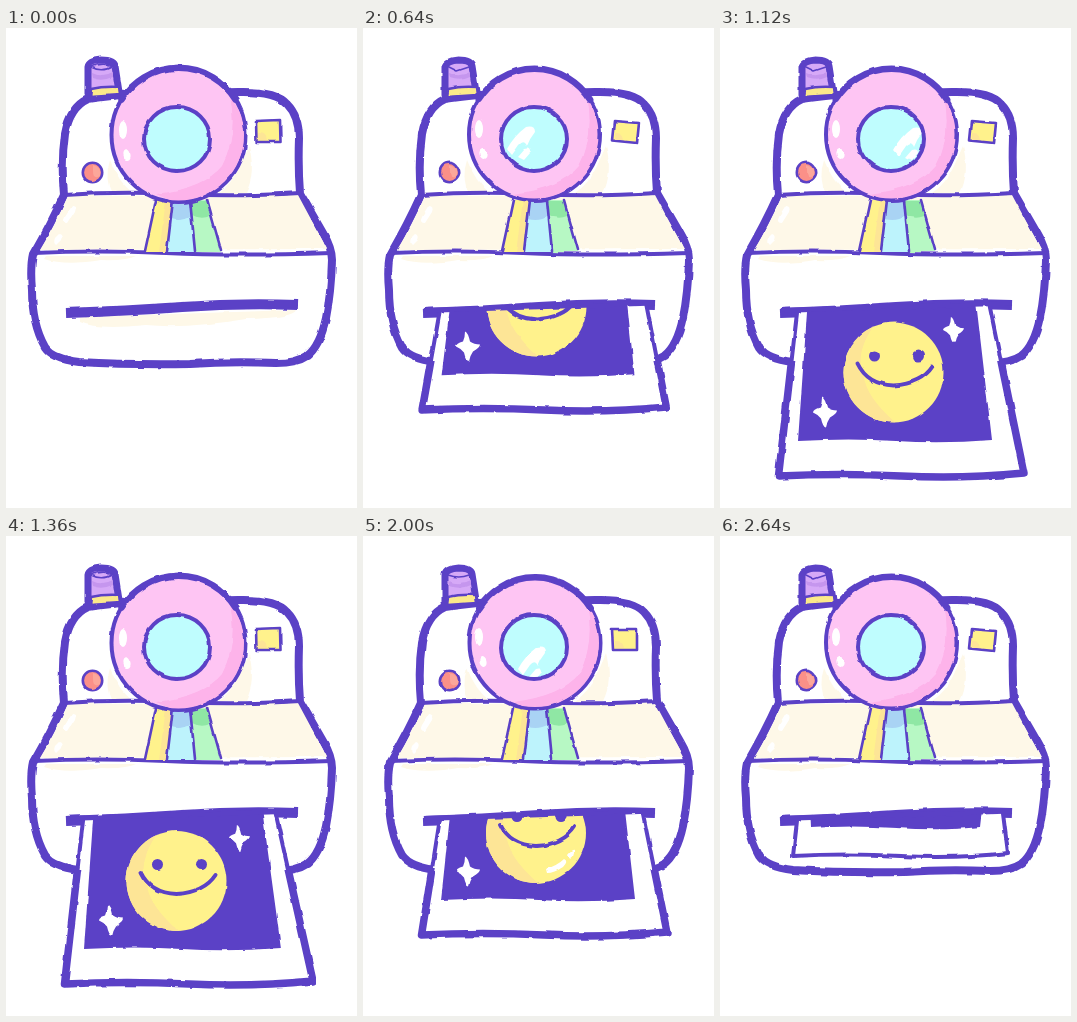
Recreate the animation shown at these times as an HTML page. Size 351 px wide and 480 px high, loop 2.72 s.

```html
<!DOCTYPE html>
<html lang="en">
<head>
<meta charset="utf-8">
<title>Instant camera</title>
<style>
  html, body { margin: 0; width: 100%; height: 100%; overflow: hidden; background: #fff; }
  svg { display: block; width: 100vw; height: 100vh; }
  .ink { stroke: #5b41c6; stroke-linecap: round; stroke-linejoin: round; }
  .bold { stroke-width: 8; }
  .mid { stroke-width: 4; }
  .thin { stroke-width: 2.6; }
  .butt { stroke-linecap: butt; }
</style>
</head>
<body>
<svg viewBox="0 0 351 480" fill="none">
  <defs>
    <filter id="rough" filterUnits="userSpaceOnUse" x="0" y="0" width="351" height="480" color-interpolation-filters="sRGB">
      <feTurbulence id="noise" type="fractalNoise" baseFrequency="0.07" numOctaves="2" seed="3" result="n"/>
      <feDisplacementMap in="SourceGraphic" in2="n" scale="3" xChannelSelector="R" yChannelSelector="G"/>
    </filter>
    <clipPath id="slotClip"><path d="M40 284.500L310 275.500V480H40Z"/></clipPath>
    <clipPath id="belowClip"><path d="M0 333H351V480H0Z"/></clipPath>
    <clipPath id="paneClip"><path id="paneShape"/></clipPath>
    <clipPath id="ringClip"><circle id="ringShape"/></clipPath>
    <clipPath id="glassClip"><ellipse cx="171" cy="111" rx="31" ry="30"/></clipPath>
    <clipPath id="faceClip"><circle r="50"/></clipPath>
    <path id="star" fill="#fff" d="M-3 -15Q0 -14 2 -5Q6 -2 12 -2Q12 1 5 5Q2 9 1 15Q-2 15 -4 6Q-7 2 -12 0Q-12 -3 -5 -5Q-3 -9 -3 -15Z"/>
  </defs>
  <g filter="url(#rough)">
    <!-- button -->
    <path class="ink" stroke-width="7" fill="#d6a9f7" d="M82 66L82 39Q83 33 95 32Q108 32 109 38L113 64Z"/>
    <path fill="#c596ee" d="M86 45Q96 50 107 44L107 49Q97 54 87 50Z"/>
    <path id="cap" class="ink" stroke-width="1.600"/>
    <!-- body -->
    <path class="ink bold" fill="#fff" d="M58 167Q55 134 59 106Q64 79 82 71Q95 69 115 67L232 64Q270 63 281 76Q293 88 293 110Q292 140 294 165L317 205Q326 220 326 232Q325 265 320 290Q314 318 301 328Q291 335 270 335Q225 333 184 336Q125 337 73 334Q47 331 39 319Q26 296 26 262Q24 240 27 227Q45 196 58 167Z"/>
    <path class="ink thin" fill="#fbe98a" d="M85 61Q98 58 113 59L114 67L84 69Z"/>
    <path fill="#fef8e8" d="M62 168L292 167L321 221L34 222Q50 196 62 168Z"/>
    <path fill="#fef8e8" d="M234 138Q226 156 212 165H240Q250 145 243 118ZM104 132Q112 154 128 166H106Q98 150 104 132ZM40 228H130Q120 233 95 232Q60 238 38 231Z"/>
    <path fill="#fff" d="M66 178Q71 178 69 184L62 195Q56 195 59 189ZM53 206Q57 207 55 212L50 217Q47 215 49 210Z"/>
    <path id="slotShade" fill="#fef8e8" d="M74 289L290 282Q287 290 240 291Q180 301 140 297Q90 302 74 294Z"/>
    <path class="ink mid" d="M58 167Q115 163 172 166T294 165M28 225Q90 222 160 225T325 225"/>
    <!-- ribbon -->
    <path fill="#fff28c" d="M150 172H167L161 224H139Z"/>
    <path fill="#bdf3fc" d="M167 172H184L189 224H161Z"/>
    <path fill="#b7f8c4" d="M184 172H201L215 224H189Z"/>
    <path fill="#fde596" d="M160 172H167L161 224H153Z"/>
    <path fill="#a9d3f4" d="M166 173H184L186 188Q176 194 165 191Z"/>
    <path fill="#8fe7a4" d="M184 173H201L204 188Q195 192 186 187Z"/>
    <path class="ink thin" d="M150 172L139 223M167 172L161 223M184 172L189 223M201 172L215 222"/>
    <!-- lens -->
    <circle id="ring" class="ink mid" fill="#fec5f3"/>
    <g clip-path="url(#ringClip)">
      <path fill="#fdb3ea" d="M224 68Q232 108 216 138Q198 160 150 166L172 176Q250 170 244 100Z"/>
    </g>
    <path id="lensTop" class="ink" stroke-width="6.500"/>
    <g id="shine" fill="#fff"><ellipse cx="117" cy="102" rx="4" ry="9"/><ellipse cx="121" cy="127" rx="3.500" ry="5" transform="rotate(-15 121 127)"/></g>
    <ellipse class="ink mid" cx="171" cy="111" rx="33" ry="32" fill="#bffdfe"/>
    <g clip-path="url(#glassClip)"><path id="glint" fill="#fff" d="M-15 9Q-8 -4 4 -13Q13 -15 13 -8Q8 -2 5 6Q2 -1 -3 5L-10 15ZM-4 17L3 9Q9 7 9 12L2 20Z"/></g>
    <!-- lamp and finder -->
    <circle class="ink thin" cx="86.500" cy="144.500" r="9.700" fill="#fb9088"/>
    <path fill="#fca79a" d="M87 137Q96 139 94 148Q87 152 87 143Z"/>
    <path id="finder" class="ink thin" fill="#fff28c"/>
    <path fill="#fde596" d="M252 105Q260 104 261 112L252 112Z"/>
    <!-- slot and print -->
    <path class="ink butt" stroke-width="10" d="M60 285Q120 283 176 279T292 277"/>
    <g id="print" clip-path="url(#slotClip)">
      <path id="paper" class="ink mid" fill="#fff"/>
      <g clip-path="url(#belowClip)"><path id="edge" class="ink" stroke-width="7.500"/></g>
      <path id="pane" fill="#5b41c6"/>
      <g clip-path="url(#paneClip)">
        <use id="starL" href="#star"/>
        <use id="starR" href="#star"/>
        <g id="face">
          <circle r="50" fill="#fff28c"/>
          <g clip-path="url(#faceClip)">
            <path fill="#fde596" d="M-16 -52Q-40 -20 -30 2Q-28 24 2 50H-55V-52Z"/>
            <path id="faceShine" fill="#fff" d="M10 36Q22 32 28 26Q33 28 27 34Q18 40 11 40ZM32 22Q37 16 39 17Q40 22 34 26Z"/>
          </g>
          <circle cx="-19" cy="-16.500" r="5.500" fill="#5b41c6"/>
          <circle cx="25" cy="-16.500" r="5.500" fill="#5b41c6"/>
          <path class="ink mid" d="M-36 -9Q-26 12 0 13Q28 11 39 -6"/>
        </g>
      </g>
    </g>
    <path id="lip" class="ink butt" stroke-width="5" d="M60 282.600L292 275"/>
  </g>
</svg>
<script>
const $ = id => document.getElementById(id);
const set = (id, attrs) => { for (const k in attrs) $(id).setAttribute(k, attrs[k]); };
const show = (id, on) => set(id, { visibility: on ? "visible" : "hidden" });
const move = (id, x, y) => set(id, { transform: `translate(${x} ${y})` });
const lerp = (a, b, t) => a + (b - a) * Math.max(0, Math.min(1, t));

// The print slides out and back through the same eleven poses.
const holds = [...Array(7).fill(160), 80, 160, 160, 80, 80, 80, 80, ...Array(5).fill(160), 80];
const total = holds.reduce((a, b) => a + b);
const tips = [0, 320, 343, 364, 382, 399, 418, 448];
const glints = { 3: [147, 107], 4: [159, 112], 5: [170, 124], 6: [183, 122], 7: [189, 113], 8: [193, 103] };

// Three hand-drawn looks that alternate.
const looks = [
  { seed: 3, ring: [172.5, 107, 67], face: [170.5, 345], right: 3, shine: [0, 0], glow: 0,
    finder: "M250 93L274 92L274.500 114L250.500 114Z", cap: "M85 39Q96 45 107 38Q96 34 85 39" },
  { seed: 11, ring: [171.5, 106.500, 65.500], face: [173.5, 344.500], right: 0, shine: [-1, -1], glow: 0,
    finder: "M251 93L276 95L274 115L249 112.500Z", cap: "M84 38L94 43L106 39" },
  { seed: 24, ring: [172, 107, 65.500], face: [173, 346], right: 0, shine: [-1, -1], glow: 1,
    finder: "M249 93L274 93L274 114L250 114Z", cap: "M85 39Q96 43 106 39" }
];

function drawPrint(pose, look) {
  show("print", pose > 0);
  show("lip", pose > 0);
  show("slotShade", pose === 0);
  const tip = tips[Math.min(pose, 7)];
  const spread = (tip - 320) / 65, out = (tip - 382) / 66;
  const left = lerp(73, 58.500, spread), right = lerp(288, 304, spread) + look.right;
  const x0 = 78, x1 = lerp(282, 268, out), mid = (left + right) / 2;
  const outline = `M${x0} 276L${left} ${tip}Q${(left + mid) / 2} ${tip - 3} ${mid} ${tip}T${right} ${tip - 3}L${x1} 270`;
  set("paper", { d: outline });
  set("edge", { d: outline });
  const base = tip - lerp(28, 35, spread);
  const pane = `M${lerp(90, 88, spread)} 270L${lerp(91, 78, spread)} ${base}` +
    `Q130 ${base - 3} 176 ${base}T${lerp(260, 272, spread) + look.right} ${base - 1}L${lerp(263, 255, out)} 265Z`;
  set("pane", { d: pane });
  set("paneShape", { d: pane });
  const dy = tip - 448;
  move("face", look.face[0], look.face[1] + dy);
  move("starL", 105, 384.5 + dy);
  set("starR", { transform: `translate(233.500 ${302 + dy}) scale(.87)` });
  show("faceShine", look.glow);
}

function drawCamera(pose, look) {
  const [cx, cy, r] = look.ring;
  set("noise", { seed: look.seed });
  set("ring", { cx, cy, r });
  set("ringShape", { cx, cy, r: r - 1.5 });
  const w = r * .85, h = r * .53;
  set("lensTop", { d: `M${cx - w} ${cy - h}A${r} ${r} 0 0 1 ${cx + w} ${cy - h}` });
  set("finder", { d: look.finder });
  set("cap", { d: look.cap });
  move("shine", ...look.shine);
  const spot = glints[pose];
  show("glint", spot);
  if (spot) move("glint", ...spot);
}

let last = -1;
function render(time) {
  let rest = time % total, step = 0;
  while (rest >= holds[step]) rest -= holds[step++];
  if (step === last) return;
  last = step;
  const pose = Math.min(step, holds.length - step);
  const look = looks[pose % 3];
  drawCamera(pose, look);
  drawPrint(pose, look);
}

const start = performance.now();
function tick(now) {
  render(Math.max(0, now - start));
  requestAnimationFrame(tick);
}
render(0);
requestAnimationFrame(tick);
</script>
</body>
</html>
```
